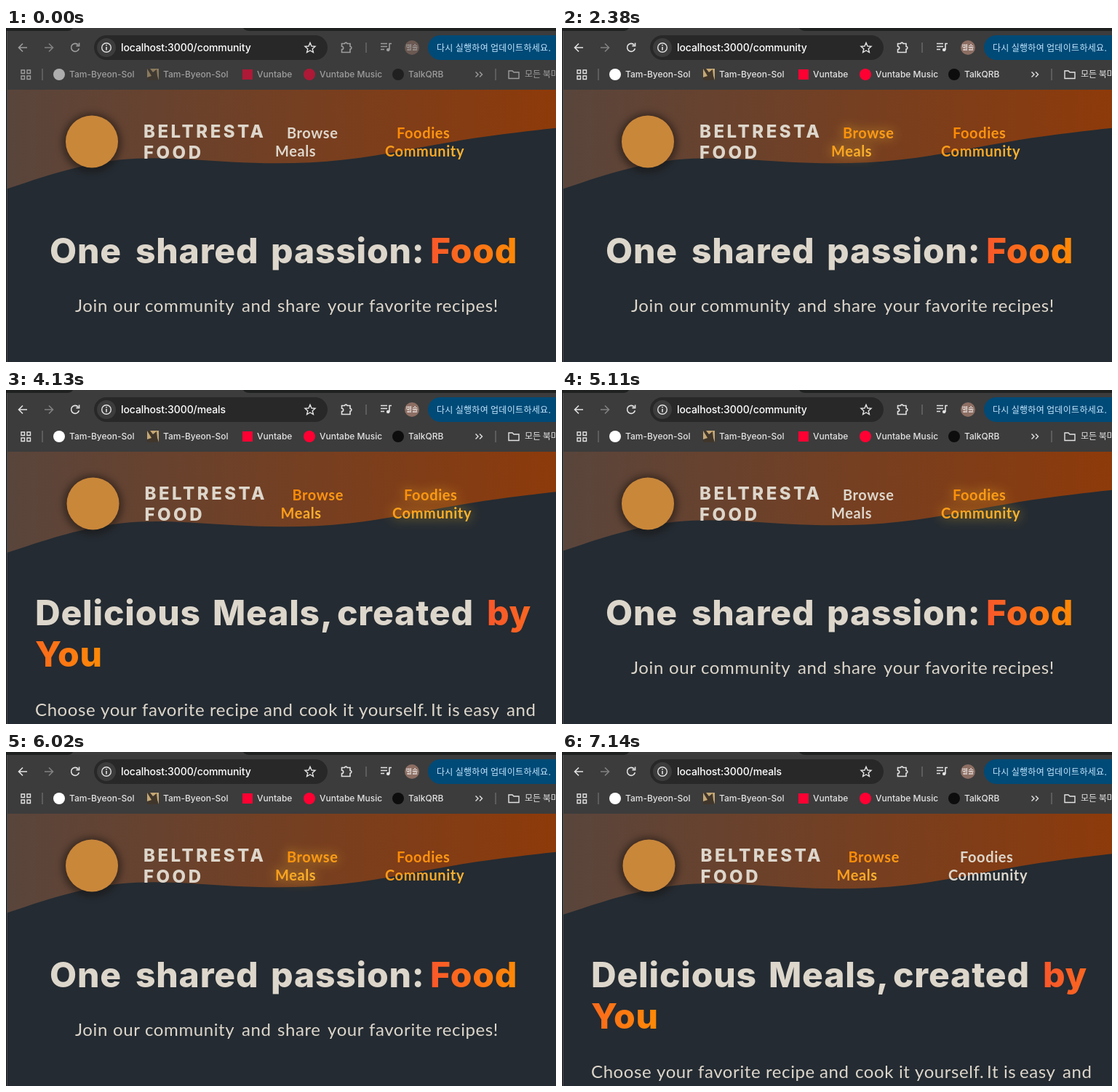
An HTML page for the animation above (8.05 s loop, 756x460 px).

```html
<!DOCTYPE html>
<html lang="en">
<head>
<meta charset="utf-8">
<title>Food community</title>
<style>
html, body { margin: 0; width: 100%; height: 100%; overflow: hidden; background: #242b32; }
svg { display: block; width: 756px; height: 460px; animation: tour 8050ms step-end infinite; }

/* Switches: which page is open, which link is hovered, how far the window has focus */
@keyframes tour {
  0%     { --meals: 0; --browse: 0; --foodies: 0; --focus: 0; }
  26.95% { --focus: .4; }
  27.82% { --focus: .7; }
  28.69% { --focus: .9; --browse: 1; }
  29.56% { --focus: 1; }
  38.26% { --meals: 1; }
  41.73% { --browse: 0; }
  51.3%  { --foodies: 1; }
  63.47% { --meals: 0; }
  73.91% { --foodies: 0; }
  74.78% { --browse: 1; }
  85.21% { --meals: 1; }
  88.69% { --browse: 0; }
}
.community { opacity: calc(1 - var(--meals)); }
.meals { opacity: var(--meals); }
.dim { opacity: calc(.58 + .42 * var(--focus)); }
.plain { opacity: calc(1 - var(--on)); fill: #ddd6cb; }
.hot { opacity: var(--on); }
.hot .first { fill: url(#warmStart); }
.hot .second { fill: url(#warmEnd); }
.glow { opacity: calc(.7 * var(--hover)); fill: #f8be2a; filter: blur(8px); }

text { white-space: pre; }
.ui { font: 500 12px Inter, sans-serif; fill: #e3e3e3; }
.url { font: 500 14px Inter, sans-serif; letter-spacing: -.1px; fill: #fff; }
.kr { font: 500 12px "Noto Sans CJK KR", "Noto Sans CJK", sans-serif; }
.brand { font: 800 24px Inter, sans-serif; letter-spacing: 3.5px; fill: #ddd6cb; }
.nav { font: 700 20px Lato, sans-serif; letter-spacing: .6px; }
.title { font: 800 48px Inter, sans-serif; letter-spacing: .8px; fill: #ddd6cb; }
.lead { font: 400 24px Lato, sans-serif; letter-spacing: .6px; fill: #ddd6cb; }
.icon { fill: none; stroke: #e3e3e3; stroke-width: 1.6; }
</style>
</head>
<body>
<svg id="stage" viewBox="0 0 756 460"></svg>
<script>
// Each word is written as "x word", words are separated by "|".
const line = (style, y, words, extra = '') =>
  `<text class="${style}" y="${y}" ${extra}>` + words.split('|').map(word => {
    const [x, text] = word.split(' ');
    return `<tspan x="${x}">${text}</tspan>`;
  }).join('') + '</text>';

const label = (style, x, y, text, extra = '') =>
  `<text class="${style}" x="${x}" y="${y}" ${extra}>${text}</text>`;

const gradient = (id, from, to) =>
  `<linearGradient id="${id}"><stop stop-color="${from}"/><stop offset="1" stop-color="${to}"/></linearGradient>`;

const icon = (d, extra = '') => `<path class="icon" d="${d}" ${extra}/>`;

const link = (top, bottom, on, hover) => {
  const text = line('nav first', 152, top) + line('nav second', 177, bottom);
  return `<g style="--on:${on};--hover:${hover}">` +
    ['plain', 'hot', 'glow'].map(kind => `<g class="${kind}">${text}</g>`).join('') + '</g>';
};

const wave = 'M0 256L48 240C96 224 192 192 288 181.3C384 171 480 181 576 186.7' +
  'C672 192 768 192 864 181.3C960 171 1056 149 1152 133.3C1248 117 1344 107 1392 101.3L1440 96V0H0Z';

const header = (scale, shift) => `
  <path d="${wave}" fill="url(#rust)" transform="translate(1.5 84.6) scale(${scale})"/>
  <g transform="translate(${shift})">
    <circle cx="118" cy="158" r="41" fill="#14100d" opacity=".5" style="filter:blur(5px)"/>
    <circle cx="118" cy="156.5" r="36" fill="#c9873a"/>
    ${label('brand', 189, 151, 'BELTRESTA')}
    ${label('brand', 189, 180, 'FOOD')}
  </g>`;

const page = (name, content) =>
  `<g class="${name}"><rect y="84" width="756" height="376" fill="#242b32"/>${content}</g>`;

const community = page('community',
  header(.535, 0) +
  link('386 Browse', '370 Meals', 'var(--browse)', 'var(--browse)') +
  link('537 Foodies', '521 Community', 1, 'var(--foodies)') +
  line('title', 324, '60 One|178 shared|364 passion:') +
  line('title', 324, '583 Food', 'style="fill:url(#fire)"') +
  line('lead', 391, '95 Join|147 our|191 community|324 and|373 share|442 your|499 favorite|591 recipes!'));

const meals = page('meals',
  header(.545, 1.5) +
  link('393.5 Browse', '377.5 Meals', 1, 'var(--browse)') +
  link('547 Foodies', '531 Community', 'var(--foodies)', 'var(--foodies)') +
  line('title', 324, '40 Delicious|284 Meals,|455 created') +
  line('title', 324, '661 by', 'style="fill:url(#fireStart)"') +
  line('title', 381, '40 You', 'style="fill:url(#fireEnd)"') +
  line('lead', 449, '40 Choose|130 your|187 favorite|280 recipe|354 and|403 cook|463 it|' +
    '485 yourself.|584 It|607 is|629 easy|688 and'));

const toolbar = `
  <rect width="756" height="85" fill="#3c3c3c"/>
  <path d="M0 0H92Q90 4 84 4H0ZM326 0H756V4H336Q328 4 326 0Z" fill="#1f2020"/>
  <rect x="121" y="10" width="321" height="34" rx="17" fill="#282828"/>
  <circle cx="138" cy="27" r="13" fill="#3c3c3c"/>
  <circle class="icon" cx="138" cy="27" r="6.3" style="stroke-width:1.4"/>
  ${icon('M138 26V30.5M138 23V24.6')}
  <g class="community">${label('url', 158, 32, 'localhost:3000/community')}</g>
  <g class="meals">${label('url', 158, 32, 'localhost:3000/meals')}</g>
  ${icon('M418 20.3L420 25L425 25.4L421.2 28.7L422.4 33.6L418 31L413.6 33.6L414.8 28.7L411 25.4L416 25Z', 'style="stroke-width:1.4"')}
  <rect x="580" y="10" width="200" height="34" rx="17" fill="#004a77"/>
  ${label('kr', 592, 31.5, '다시 실행하여 업데이트하세요.', 'fill="#c2e7ff" letter-spacing=".3"')}
  ${icon('M53 27H64M59 21.5L64.5 27L59 32.5', 'opacity=".42"')}
  <g class="dim">
    ${icon('M29 27H18M23 21.5L17.5 27L23 32.5')}
    ${icon('M99.2 23.2A5.5 5.5 0 1 0 100.4 28.3M100.6 20.5V24.6H96.5')}
    ${icon('M461.5 21.5H465.5A1.8 1.8 0 0 1 469 21.5H473V25.5A1.8 1.8 0 0 1 473 29.2V33.5H461.5V29.6A2.2 2.2 0 0 0 461.5 25.2Z')}
    ${icon('M515 21.5H524M515 25.5H524M515 29.5H520M527 30V21.5H530')}
    <circle cx="525.2" cy="30" r="2.3" fill="#e3e3e3"/>
    <circle cx="558" cy="27" r="10" fill="#8d6e63"/>
    ${label('kr', 558, 30.3, '별솔', 'fill="#fff" text-anchor="middle" style="font-size:9px;font-weight:400"')}
  </g>
  <path d="M495 20V34M50 56V72M673 56V72" stroke="#6b6b6b" stroke-width="1.4"/>`;

const bookmarks = `<g class="dim">
  ${icon('M21 58H25.5V62.5H21ZM29 58H33.5V62.5H29ZM21 66H25.5V70.5H21ZM29 66H33.5V70.5H29Z', 'style="stroke-width:1.4"')}
  <circle cx="73" cy="64" r="8" fill="#fff"/>
  ${label('ui', 87, 68, 'Tam-Byeon-Sol')}
  <rect x="194" y="56" width="16" height="16" fill="#c5a875"/>
  <path d="M194 56H198L202 61L207 57L208 66L210 72H194V68L200 66Z" fill="#40362b"/>
  ${label('ui', 216, 68, 'Tam-Byeon-Sol')}
  <rect x="325" y="57" width="14" height="14" fill="#ff0033"/>
  ${label('ui', 345, 68, 'Vuntabe')}
  <circle cx="417" cy="64" r="8" fill="#ff0033"/>
  ${label('ui', 431, 68, 'Vuntabe Music')}
  <circle cx="539" cy="64" r="8" fill="#0d0d0d"/>
  ${label('ui', 553, 68, 'TalkQRB')}
  ${icon('M645.5 60.5L649 64L645.5 67.5M651 60.5L654.5 64L651 67.5', 'style="stroke-width:1.4"')}
  ${icon('M691 59H696L698 61H705V69.5H691Z', 'style="stroke-width:1.4"')}
  ${label('kr', 713, 68, '모든 북마크', 'fill="#e3e3e3"')}
</g>`;

document.getElementById('stage').innerHTML = `<defs>
  ${gradient('rust', '#59453c', '#8f3a09')}
  ${gradient('fire', '#f9572a', '#ff8a05')}
  ${gradient('fireStart', '#f9572a', '#fb6620')}
  ${gradient('fireEnd', '#fb6a1c', '#ff8a05')}
  ${gradient('warmStart', '#ff8a05', '#fd9a16')}
  ${gradient('warmEnd', '#fd9a16', '#f9b331')}
</defs>` + community + meals + toolbar + bookmarks +
  '<path d="M.5 0V460" stroke="#151718"/><path d="M1.5 4V460" stroke="#56585a" stroke-width=".7"/>';
</script>
</body>
</html>
```
